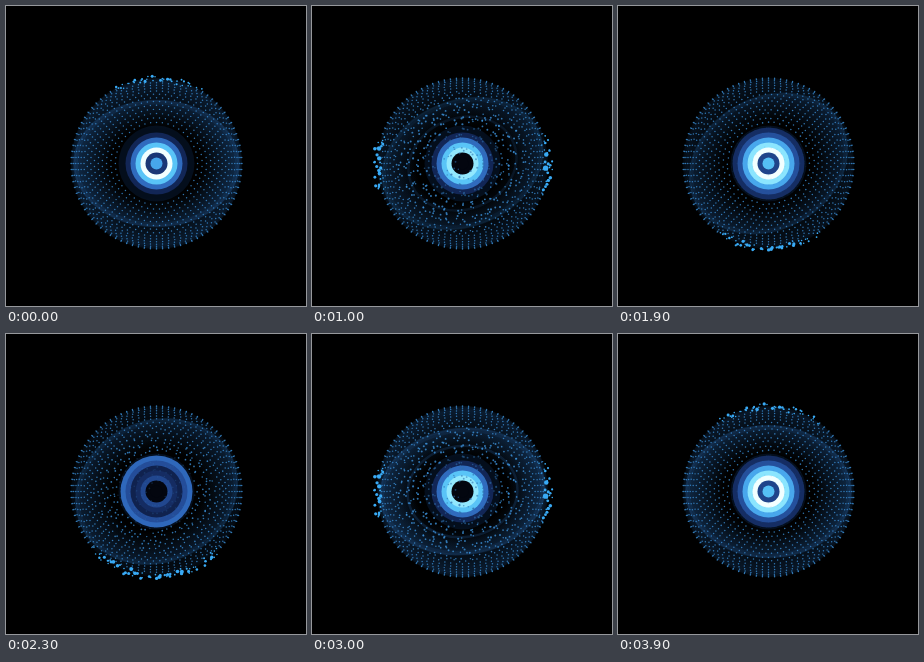
An HTML page with a canvas that plays this animation: 300 px wide and 300 px high, repeating every 4 s.

```html
<!DOCTYPE html>
<html lang="en">
<head>
<meta charset="utf-8">
<title>Particle sphere</title>
<style>
html, body { margin: 0; width: 100%; height: 100%; overflow: hidden; background: #000; }
canvas { display: block; width: 300px; height: 300px; }
</style>
</head>
<body>
<canvas id="stage" width="300" height="300"></canvas>
<script>
const ctx = document.getElementById('stage').getContext('2d');
const LOOP = 4000, STEP = 100, TAU = Math.PI * 2;
const CX = 150.5, CY = 157.5, R = 85.5;

const wave = (t, period, peak = 0) => Math.cos(TAU * (t - peak) / period);
const clamp = x => Math.max(0, Math.min(1, x));
const smooth = x => x * x * (3 - 2 * x);

function random(seed) {
  return () => {
    seed = (seed * 1664525 + 1013904223) % 4294967296;
    return seed / 4294967296;
  };
}

// Black through blue and cyan to white
function glow(level) {
  const x = clamp(level);
  const r = .38 * x + .57 * x ** 14;
  const g = x * (.8 + .2 * x * x);
  const b = 1 - (1 - x) ** 2;
  return `rgb(${[r, g, b].map(v => Math.round(v * 255))})`;
}

// Concentric rings, packed closer together towards the rim
function makeDots() {
  const rnd = random(41), dots = [], rings = 22;
  for (let i = 2; i <= rings; i++) {
    const r = R * (1 - (1 - i / rings) ** 1.45);
    const count = Math.round(TAU * r / 24) * 4;
    const shift = r < 72 ? (i % 2) / 2 : 0;
    for (let j = 0; j < count; j++) {
      dots.push({
        r, a: Math.PI / 2 + (j + shift) / count * TAU,
        dx: rnd() * 2 - 1, dy: rnd() * 2 - 1, size: rnd(), turn: rnd() * TAU
      });
    }
  }
  return dots;
}
const dots = makeDots();

function disc(x, y, r, fill) {
  ctx.fillStyle = fill;
  ctx.beginPath();
  ctx.arc(x, y, r, 0, TAU);
  ctx.fill();
}

function oval(rx, ry, width, alpha) {
  ctx.strokeStyle = `rgba(45,105,170,${alpha})`;
  ctx.lineWidth = width;
  ctx.beginPath();
  ctx.ellipse(0, 0, rx, ry, 0, 0, TAU);
  ctx.stroke();
}

function haze(rx, ry, alpha) {
  ctx.save();
  ctx.scale(rx, ry);
  const g = ctx.createRadialGradient(0, 0, .55, 0, 0, 1);
  g.addColorStop(0, 'rgba(26,70,120,0)');
  g.addColorStop(.9, `rgba(26,70,120,${alpha})`);
  g.addColorStop(1, `rgba(26,70,120,${alpha * .5})`);
  disc(0, 0, 1, g);
  ctx.restore();
}

function drawShell(t, scatter) {
  const half = 71 - 8 * wave(t, 1000, 50);
  const tilt = -14 + 16 * wave(t, LOOP, -300);
  ctx.save();
  ctx.translate(CX, CY);
  ctx.rotate(tilt * Math.PI / 180);
  ctx.globalAlpha = Math.cbrt(Math.abs(Math.sin(Math.PI * (t - 1400) / LOOP)));
  haze(R, R, .4 * clamp((79 - half) / 15));
  haze(83, half, .32);
  oval(81, half - 2, 5, .12);
  oval(82, half - 1, 2, .14);
  oval(55, half * .72, 2.5, .22 * scatter ** 4);
  ctx.restore();
}

function drawCenter(t) {
  const core = Math.sqrt(Math.max(0, wave(t, 2000, 1750)));
  disc(CX, CY, 38, 'rgba(14,40,80,.35)');
  for (let i = 0; i < 5; i++) {
    const peak = 540 + 400 * smooth(i / 4);
    const level = .46 + .03 * i + .38 * wave(t, 1000, peak);
    const boost = i === 4 ? .1 * core : 0;
    if (level > .1) disc(CX, CY, 36 - i * 5, glow(level + boost));
  }
  disc(CX, CY, 11, glow(.03 + .33 * core * core));
  disc(CX, CY, 6, glow(.03 + .82 * core));
}

function drawDots(t, scatter) {
  const phase = t / LOOP * TAU;
  const sweepY = CY - R * Math.cos(phase);
  const reach = 11 + 18 * scatter;
  const sparks = [];
  for (const d of dots) {
    const inner = clamp((74 - d.r) / 22);
    const push = 4.5 * scatter * inner;
    const x = CX + d.r * Math.cos(d.a) + push * (d.dx + .4 * Math.cos(phase * 2 + d.turn));
    const y = CY + d.r * Math.sin(d.a) + push * (d.dy + .4 * Math.sin(phase * 2 + d.turn));
    const near = 1 - Math.abs(y - sweepY) / reach;
    if (d.r > 82 && near > 0) {
      sparks.push([d, near]);
      continue;
    }
    const covered = d.r < 38;
    ctx.globalAlpha = covered ? .6 * scatter : .78;
    const size = .74 + .35 * d.size * scatter * inner;
    disc(x, y, size, covered ? '#2f70ae' : '#3d94dc');
  }
  ctx.globalAlpha = 1;
  const lift = .5 + .5 * scatter;
  for (const [d, near] of sparks) {
    const r = d.r + (d.dx + .3) * 3.5 * lift;
    const a = d.a + d.dy * .06;
    const size = .75 + 2 * d.size ** 2 * Math.sqrt(near) * lift;
    disc(CX + r * Math.cos(a), CY + r * Math.sin(a), size, '#39aaf5');
  }
}

function draw(t) {
  const scatter = Math.abs(Math.sin(t / LOOP * TAU));
  ctx.globalAlpha = 1;
  ctx.fillStyle = '#000';
  ctx.fillRect(0, 0, 300, 300);
  drawShell(t, scatter);
  drawCenter(t);
  drawDots(t, scatter);
}

let start = null, shown = -1;
function tick(now) {
  if (start === null) start = now;
  const t = Math.floor(((now - start) % LOOP) / STEP) * STEP;
  if (t !== shown) draw(shown = t);
  requestAnimationFrame(tick);
}
draw(0);
requestAnimationFrame(tick);
</script>
</body>
</html>
```
